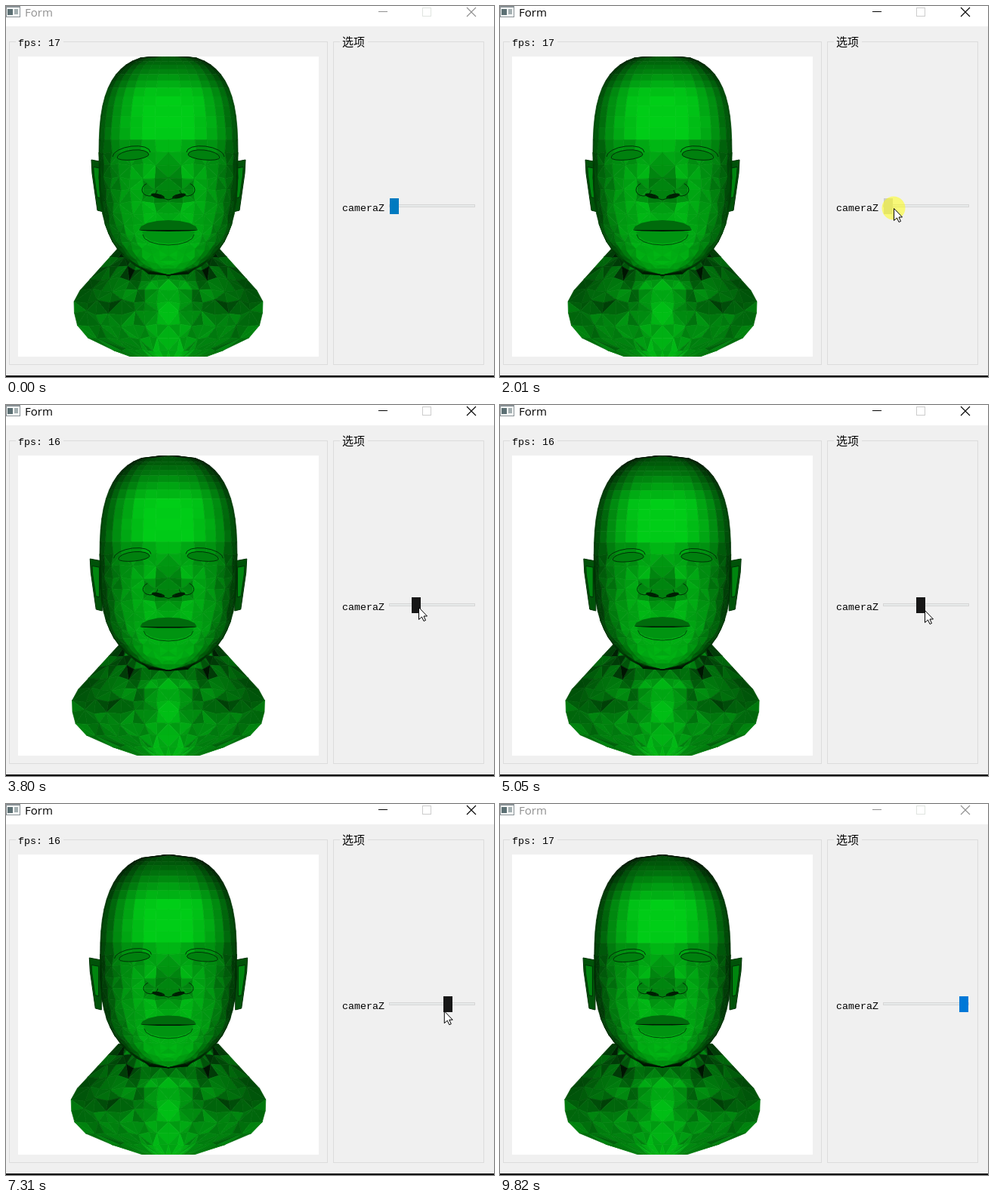
An HTML page with a canvas for the animation above (9.95 s loop, 646x492 px).

```html
<!DOCTYPE html>
<html lang="en">
<head>
<meta charset="utf-8">
<title>Form</title>
<style>
html, body { margin: 0; width: 100%; height: 100%; overflow: hidden; background: #f0f0f0; }
canvas { display: block; }
</style>
</head>
<body>
<canvas id="stage" width="646" height="492"></canvas>
<script>
const ctx = document.getElementById('stage').getContext('2d');
const LOOP = 9950, CENTER = 215, DARK = '#003006';

// Times in ms; each jump moves the slider one page, each fps change toggles 17 and 16
const jumps = [2040, 3700, 4950, 6140, 6140, 7760, 7760];
const fpsChanges = [790, 1700, 2840, 5600, 6820, 8640];
const presses = [[1600, 2040], [3600, 3800], [4710, 5050], [5830, 6240], [7600, 7860]];
// Pointer moves: [start, end, x, y]
const moves = [
  [90, 640, 495, 233], [790, 1160, 518, 268], [1600, 1830, 521, 268], [2040, 2660, 539, 268],
  [3200, 3600, 546, 268], [4320, 4710, 562, 272], [5490, 5830, 596, 280],
  [6820, 7000, 572, 274], [7190, 7600, 609, 275], [8640, 8860, 622, 492]
];
// Relief of the face: [x, y, radius x, radius y, height]
const relief = {
  nose: [0, 242, 14, 34, 20], wing: [25, 244, 9, 9, 9], socket: [42, 198, 23, 12, -9],
  cheek: [56, 238, 22, 20, 6], lips: [0, 298, 34, 13, 9], chin: [0, 340, 28, 13, 6]
};
const shoulders = [[318, 64], [386, 125], [405, 125], [427, 119], [439, 103], [458, 55], [466, 28]];

const clamp = (v, lo = 0, hi = 1) => Math.min(hi, Math.max(lo, v));
const range = (n, make) => Array.from({ length: n + 1 }, (_, i) => make(i, i / n));
const countBefore = (times, t) => times.filter(time => time <= t).length;
const bell = (v, radius) => Math.exp(-((v / radius) ** 2));
const noise = (a, b) => { const n = Math.sin(a * 12.9 + b * 78.2) * 43758.5; return n - Math.floor(n) - .5; };
const green = b => { const v = clamp(b, .1); return `rgb(0,${Math.round(206 * v)},${Math.round(23 * v)})`; };

function trace(points, fill, stroke, width = 1, close = true) {
  ctx.beginPath();
  points.forEach(([x, y]) => ctx.lineTo(x, y));
  if (close) ctx.closePath();
  if (fill) { ctx.fillStyle = fill; ctx.fill(); }
  if (stroke) { ctx.strokeStyle = stroke; ctx.lineWidth = width; ctx.stroke(); }
}

function box(x, y, w, h, fill) {
  ctx.fillStyle = fill;
  ctx.fillRect(x, y, w, h);
}

function label(text, x, y, font, color = '#000') {
  ctx.font = font;
  ctx.fillStyle = color;
  ctx.fillText(text, x, y);
}

// Two superellipses joined at the ears
function skullWidth(y) {
  return y < 205 ? 92 * (1 - clamp((205 - y) / 140) ** 3) ** .36 : 92 * (1 - clamp((y - 205) / 152) ** 3) ** .5;
}

function shoulderWidth(y) {
  const i = clamp(shoulders.findIndex(p => p[0] >= y), 1, shoulders.length - 1);
  const [y0, w0] = shoulders[i - 1], [y1, w1] = shoulders[i];
  return w0 + (w1 - w0) * (y - y0) / (y1 - y0);
}

// Brightness of the relief under a light at the camera
function slopeLight(x, y) {
  let gx = 0, gy = 0;
  for (const [px, py, rx, ry, height] of Object.values(relief)) {
    const k = height * bell(x - px, rx) * bell(y - py, ry);
    gx += k * 2 * (x - px) / rx ** 2;
    gy += k * 2 * (y - py) / ry ** 2;
  }
  return 1 / Math.hypot(1, gx, gy);
}

// Symmetric facets between rows of [y, half width]
function mesh(rows, column, shade, place, wobble) {
  const vertex = (i, j) => {
    const [y, w] = rows[i], k = j % 8 && i && i < rows.length - 1 ? wobble(y) : 0;
    return [w * column(j / 8) + k * noise(i, j), y + k * noise(j + 9, i)];
  };
  for (let i = 0; i < rows.length - 1; i++) for (let j = 0; j < 8; j++) {
    const a = vertex(i, j), b = vertex(i, j + 1), c = vertex(i + 1, j + 1), d = vertex(i + 1, j);
    const facets = !wobble(a[1]) ? [[a, b, c, d]] : (i + j) % 2 ? [[a, b, c], [a, c, d]] : [[a, b, d], [b, c, d]];
    facets.forEach((facet, n) => {
      const mean = axis => facet.reduce((sum, p) => sum + p[axis], 0) / facet.length;
      const color = green(shade(column((j + .5) / 8), mean(0), mean(1), noise(i * 2 + n, j + 3)));
      for (const side of [1, -1]) trace(facet.map(([x, y]) => place(x * side, y)), color, color, .7);
    });
  }
}

// Upper half of an almond from left to right, then its lower half
function almond(cx, cy, r, up, down, tilt = 0) {
  return range(16, (i, k) => {
    const a = Math.PI * (1 + 2 * k), s = Math.sin(a);
    return [cx + r * Math.cos(a), cy + s * (s < 0 ? up : down) - tilt * Math.cos(a)];
  });
}

// far: 0 with the camera close, 1 with the camera at its farthest
function drawHead(far) {
  const face = (x, y) => {
    const edge = Math.min(1, Math.abs(x) / 92);
    return [CENTER + x * (1 - far * (.02 + .05 * (1 - edge * edge))),
      y + far * 8 * Math.sin((y - 45) * Math.PI / 205)];
  };
  const body = (x, y) => [CENTER + x * (1 + .034 * far), y + Math.max(0, y - 405) * .12 * (1 - far)];
  const ear = (x, y) => [CENTER + x + Math.sign(x) * 3 * far, y];
  const mirror = (points, place, fill, stroke, close) => {
    for (const side of [1, -1]) trace(points.map(([x, y]) => place(x * side, y)), fill, stroke, 1, close);
  };

  const neckRows = range(10, (i, k) => 318 + 148 * k).map(y => [y, shoulderWidth(y)]);
  const neckShade = (u, x, y, n) => .6 + .3 * bell(x, 28) + .16 * n + .14 * noise(Math.round(u * 16), 5)
    - .38 * bell(x - 62 + .4 * (y - 325), 9) * bell(y - 350, 40)
    - .25 * bell(x - 75, 30) * bell(y - 396, 8) - .2 * bell(u - 1, .2) * bell(y - 360, 30)
    - .3 * bell(x, 50) * bell(y - 352, 10);
  mesh(neckRows, k => k, neckShade, body, () => 6);

  const lobe = [[86, 207], [102, 204], [101, 222], [94, 271], [86, 273]];
  mirror(lobe, ear, green(.4), DARK);
  mirror(lobe.map(([x, y]) => [x * .6 + 38, y * .6 + 91]), ear, green(.65), DARK);

  const headRows = range(28, (i, k) => 65 + 292 * (k - .1 * Math.sin(2 * Math.PI * k))).map(y => [y, skullWidth(y)]);
  const headShade = (u, x, y, n) => (1 - (.66 + .08 * far) * u ** 3) * slopeLight(x, y)
    * Math.min(1, .42 - .08 * far + (y - 67) / 90) * (y > 182 ? .88 : 1) + (y > 182 ? .09 : .04) * n
    - .15 * bell(y - 357, 9);
  mesh(headRows, k => Math.sin(k * Math.PI / 2), headShade, face, y => y > 182 ? 4 : 0);

  mirror(almond(47, 199, 21, 8, 5, -2), face, green(.62), DARK);
  mirror(almond(49, 197, 25, 11, 0, -3).slice(0, 9), face, null, DARK, false);
  mirror(almond(25, 244, 10, 9, 8).slice(5), face, null, DARK, false);
  mirror(almond(14, 252, 9, 3, 3, 2), face, green(.15));
  mirror([[0, 257], [7, 255], [10, 250]], face, null, DARK, false);
  trace(almond(0, 297, 39, 13, 0).map(p => face(...p)), green(.52));
  trace(almond(0, 299, 35, 0, 16).map(p => face(...p)), green(.72));
  trace(almond(0, 297, 39, 0, 2).map(p => face(...p)), green(.12));
  trace(almond(0, 303, 34, 0, 14).slice(8).map(p => face(...p)), null, green(.35), 1, false);
}

function drawWindow(active, fps) {
  const ink = active ? '#000' : '#909090';
  box(0, 0, 646, 492, '#f0f0f0');
  box(0, 0, 646, 27, '#fff');
  box(0, 490, 646, 2, '#000');

  box(0, 0, 19, 15, '#8a9296');
  box(1, 2, 17, 12, '#f4f6f6');
  box(2, 4, 7, 8, '#5c7074');
  box(11, 4, 5, 7, '#a4b0b2');
  label('Form', 25, 14, '15px "Open Sans", sans-serif', ink);

  box(493, 7, 12, 1, ink);
  ctx.lineWidth = 1;
  ctx.strokeStyle = active ? '#ccc' : '#e0e4e0';
  ctx.strokeRect(551.5, 2.5, 11, 11);
  trace([[610, 2], [622, 14]], null, ink, 1.1, false);
  trace([[622, 2], [610, 14]], null, ink, 1.1, false);

  ctx.lineWidth = 1;
  ctx.strokeStyle = '#dcdcdc';
  ctx.strokeRect(4.5, 47.5, 421, 428);
  ctx.strokeRect(433.5, 47.5, 199, 428);
  box(13, 44, 63, 8, '#f0f0f0');
  box(442, 44, 37, 8, '#f0f0f0');
  const mono = '13.33px "Liberation Mono", monospace';
  label('fps: ' + fps, 16, 53, mono);
  label('选项', 445, 53, '15px "Noto Sans CJK SC", "Noto Sans CJK", sans-serif');
  label('cameraZ', 445, 272, mono);
  box(16, 67, 398, 398, '#fff');
}

function pointerAt(t) {
  let x = 607, y = 492;
  for (const [start, end, toX, toY] of moves) {
    const k = clamp((t - start) / (end - start)), ease = k * k * (3 - 2 * k);
    x += (toX - x) * ease;
    y += (toY - y) * ease;
  }
  return [x, y];
}

function drawSlider(t, handle) {
  const [x, y] = pointerAt(t);
  const hover = x >= handle && x <= handle + 12 && y >= 255 && y <= 276;
  const held = t >= presses[0][0] && t < presses[0][1];
  box(507, 263, 114, 4, '#d6d6d6');
  box(508, 264, 112, 2, '#e7eaea');
  box(handle, 255, 12, 21, held ? '#ccc' : hover ? '#171717' : t < 790 ? '#007ac0' : '#0078d7');
  if (presses.some(([from, to]) => t >= from && t < to)) {
    ctx.fillStyle = 'rgba(255,255,0,.5)';
    ctx.beginPath();
    ctx.arc(x, y, 15.5, 0, 7);
    ctx.fill();
  }
  const arrow = [[0, 0], [0, 16], [4, 12.5], [6.5, 18], [9, 17], [6.5, 11.5], [11, 11.5]];
  trace(arrow.map(([dx, dy]) => [x + dx + .5, y + dy + .5]), '#fff', '#000');
}

function frame() {
  const t = performance.now() % LOOP;
  const pages = countBefore(jumps, t), zoom = pages / jumps.length;
  drawWindow(t >= 1650 && t < 9820, 17 - countBefore(fpsChanges, t) % 2);
  ctx.save();
  ctx.beginPath();
  ctx.rect(16, 67, 398, 398);
  ctx.clip();
  drawHead(1.4 * zoom / (zoom + .4));
  ctx.restore();
  drawSlider(t, Math.round(508 + 14.25 * pages));
  requestAnimationFrame(frame);
}
frame();
</script>
</body>
</html>
```
